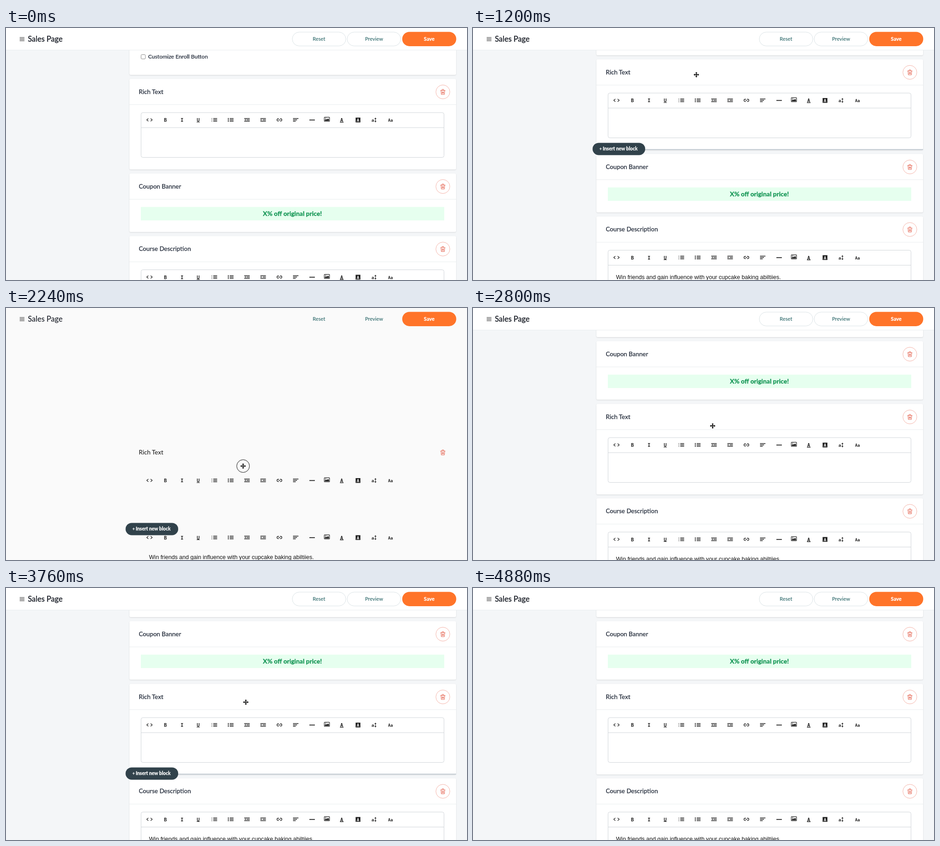
Write an HTML page that moves like this. It is 1012 by 554 pixels and loops after 5.28 s.

```html
<!DOCTYPE html>
<html lang="en">
<head>
<meta charset="utf-8">
<title>Sales Page</title>
<style>
  html, body { margin: 0; width: 100%; height: 100%; overflow: hidden; }
  svg { display: block; width: 1012px; height: 554px; font-family: Lato, "Open Sans", sans-serif;
    --page: #f4f6f8; --paper: #fff; --line: #e9edef; --frame: #d0d5d9; --ring: #f5b3a8;
    --mint: #e6ffef; --pill: #dbe3e6; --rule: #c0c9d1; --shadow: #00000020; --title: #303846; --stress: .25px; }
  svg.flat { --page: #fafafa; --paper: #fafafa; --line: #fafafa; --frame: #fafafa; --ring: #fafafa;
    --mint: #fafafa; --pill: #fafafa; --rule: #fafafa; --shadow: transparent; --title: #222; --stress: 0; }
  .page { fill: var(--page); }
  .paper { fill: var(--paper); }
  .card { fill: var(--paper); filter: drop-shadow(0 1px 1px var(--shadow)); }
  .line { stroke: var(--line); }
  .frame { fill: var(--paper); stroke: var(--frame); }
  .ring { fill: var(--paper); stroke: var(--ring); }
  .pill { fill: var(--paper); stroke: var(--pill); }
  .title { font-size: 13.5px; font-weight: 500; fill: var(--title); stroke: var(--title); stroke-width: var(--stress); }
  .heading { font-size: 16.5px; fill: #1c2029; stroke: #1c2029; }
  .action { font-size: 11.2px; font-weight: 500; fill: #286567; text-anchor: middle; }
  .bold { font-weight: 700; fill: #fff; stroke: #fff; stroke-width: .3px; }
  .offer { font-size: 14px; text-anchor: middle; fill: #129453; stroke: #129453; }
  .mono { font: 700 10.5px "DejaVu Sans Mono", monospace; text-anchor: middle; fill: #222; }
  .ink { stroke: #222; fill: none; }
</style>
</head>
<body>
<svg id="stage" viewBox="0 0 1012 554">
  <defs>
    <g id="trash">
      <circle class="ring" cx="959" cy="28.5" r="15.3"/>
      <path d="M953.5 25.5h11M957 25v-2h4v2M955 26l.6 8h6.8l.6-8M957.5 28v4M959 28v4M960.5 28v4" fill="none" stroke="#e4604d"/>
    </g>
    <g id="editor">
      <rect class="frame" x="296.5" y=".5" width="665" height="98.5" rx="4"/>
      <path class="line" style="stroke:var(--frame)" d="M297 33.5h665"/>
      <g id="tools"></g>
    </g>
  </defs>
  <rect class="page" width="1012" height="554"/>
  <g id="top">
    <rect class="card" x="271" y="-100" width="717" height="203" rx="3"/>
    <rect x="296.5" y="58.5" width="9.5" height="9.5" rx="2" fill="#fff" stroke="#888"/>
    <text class="title" x="312" y="67" style="font-size:12.3px">Customize Enroll Button</text>
  </g>
  <g id="course"></g>
  <g id="coupon"></g>
  <g id="rich"></g>
  <g id="header">
    <rect class="paper" width="1012" height="48"/>
    <path class="line" d="M0 48.5h1012"/>
    <path d="M30 20.5h10.5m-10.5 2h10.5m-10.5 2h10.5m-10.5 2h10.5m-10.5 2h10.5" stroke="#555" stroke-width=".9"/>
    <text class="title heading" x="48" y="30">Sales Page</text>
    <rect class="pill" x="628.5" y="9" width="117.5" height="30.5" rx="15.25"/>
    <rect class="pill" x="749" y="9" width="117.5" height="30.5" rx="15.25"/>
    <rect x="869.8" y="8.4" width="118.6" height="31.6" rx="15.8" fill="#ff7429"/>
    <text class="action" x="687" y="28">Reset</text>
    <text class="action" x="808" y="28">Preview</text>
    <text class="action bold" x="929" y="28">Save</text>
  </g>
  <g id="cursor">
    <circle id="press" r="14" fill="var(--paper)" stroke="#111"/>
    <path id="arrow" d="M0 0v11.5l2.7-2.4 1.9 4.3 2.2-1-1.9-4.2h3.6z" fill="#000" stroke="#fff" stroke-width=".9"/>
    <path id="move" d="M0-6 2.4-3.3H.8V-.8H3.3V-2.4L6 0 3.3 2.4V.8H.8V3.3H2.4L0 6-2.4 3.3H-.8V.8H-3.3V2.4L-6 0-3.3-2.4V-.8H-.8V-3.3H-2.4Z"
      fill="#000" stroke="#fff" stroke-width="1.4" paint-order="stroke"/>
  </g>
</svg>
<script>
const $ = id => document.getElementById(id);
const LOOP = 5280, STEP = 80;

// Toolbar, drawn around y = 17 inside the editor box
const glyph = (x, text, extra = '') => `<text class="mono" x="${x}" y="20.5" ${extra}>${text}</text>`;
const ink = (d, width = 1.5) => `<path class="ink" stroke-width="${width}" d="${d}"/>`;
const solid = d => `<path fill="#222" d="${d}"/>`;
const rows = (x, width) => ink([13.5, 16.5, 19.5].map(y => `M${x} ${y}h${width}`).join(''), 1.7);
const indent = x => ink(`M${x} 13.5h12M${x + 5} 16.5h7M${x} 19.5h12`, 1.7);
$('tools').innerHTML = [
  ink('M312.5 13.5 309 16.5l3.5 3M317.5 13.5l3.5 3-3.5 3', 1.3),
  glyph(350, 'B'), glyph(386.5, 'I', 'font-style="italic"'),
  glyph(422, 'U'), ink('M418.5 21.5h7', 1),
  rows(455, 8.5), ink('M452 12.5v2M452 15.7v1.8M452 18.7v2', .9),
  rows(491, 8.5), ink('M487 13.5h2M487 16.5h2M487 19.5h2', 1.8),
  indent(523), solid('M526.5 14.7v3.6l-3-1.8z'),
  indent(558.5), solid('M559 14.7v3.6l3-1.8z'),
  ink('M599 14h-1.5a2.6 2.6 0 0 0 0 5.2h1.5M601.5 14h1.5a2.6 2.6 0 0 1 0 5.2h-1.5M598 16.6h4.5', 1.3),
  ink('M630 13.5h12M630 16.5h9M630 19.5h6', 1.7),
  ink('M666 16.8h12', 1.8),
  '<rect class="ink" x="698.7" y="10.7" width="11.6" height="9" rx="1" stroke-width="1.2"/>',
  solid('M700 18.5v-2l2.5-2 2 1.5 2.5-3 2 3v2.5z'), '<circle cx="702" cy="13" r="1" fill="#222"/>',
  glyph(737, 'A'), ink('M733 21.7h8', 1.4),
  '<rect x="767.5" y="11.5" width="10.5" height="10.5" fill="#222"/>',
  glyph(772.7, 'A', 'style="fill:#fff;font-size:9px"'),
  glyph(805, 'a', 'style="font-size:9.5px"'),
  ink('M811 13v7.5', 1), solid('M808.7 14.5 811 11.5l2.3 3zM808.7 19 811 22l2.3-3z'),
  glyph(844, 'Aa', 'style="font-size:8.8px"')
].join('');

// Cards, each drawn from its own top edge
const card = (title, height, body) => `
  <rect class="card" x="271" width="717" height="${height}" rx="3"/>
  <path class="line" d="M271 56.5h717"/>
  <text class="title" x="291.5" y="32.8">${title}</text>
  <use href="#trash"/>${body}`;
const editor = '<use href="#editor" y="73.5"/>';

$('rich').innerHTML = card('Rich Text', 199, `${editor}
  <path id="rule" d="M272 198.2h716" stroke="var(--rule)" stroke-width="1.8"/>
  <g id="insert">
    <rect x="262.5" y="183.4" width="115.5" height="27" rx="13.5" fill="#31424b"/>
    <text class="bold" x="277.5" y="199.8" font-size="9">+</text>
    <text class="bold" x="285" y="200" font-size="10.4">Insert new block</text>
  </g>`);
$('coupon').innerHTML = card('Coupon Banner', 128.5, `
  <rect x="296" y="73.5" width="666" height="29.5" fill="var(--mint)"/>
  <text class="bold offer" x="628.7" y="92.5">X% off original price!</text>`);
$('course').innerHTML = card('Course Description', 240, `${editor}
  <text x="314" y="137.5" font-size="12.57" fill="#111" font-family="Liberation Sans, Arial, sans-serif">Win friends and gain influence with your cupcake baking abiltiies.</text>`);

// Tracks: [time, value, ...]
const tracks = {
  scroll: [[160, 0], [560, -42], [800, -42], [880, -43], [2400, -43], [2720, -39]],
  drag: [[1840, 0], [2240, 220], [2320, 222], [2720, 138]],
  swap: [[2400, 0], [2560, -208]],
  insert: [[720, 0], [960, 1], [2720, 1], [2800, 0], [3120, 0], [3200, .22], [3440, 1], [4560, 1], [4800, 0]],
  pointer: [[480, 425, 250], [640, 451, 128], [1360, 496, 99], [1840, 496, 99], [2240, 520.5, 347.5],
    [2320, 522, 349], [2720, 526, 262], [2960, 526.5, 251], [4080, 526.5, 251], [4240, 489, 284.5], [4480, 400, 570]]
};

function at(track, t) {
  const next = track.findIndex(key => key[0] > t);
  if (next < 0) return track[track.length - 1].slice(1);
  if (next === 0) return track[0].slice(1);
  const a = track[next - 1], b = track[next];
  const p = (t - a[0]) / (b[0] - a[0]), ease = p * p * (3 - 2 * p);
  return a.slice(1).map((v, i) => v + (b[i + 1] - v) * ease);
}

const place = (id, y, x = 0) => $(id).setAttribute('transform', `translate(${x} ${y})`);
const show = (id, opacity) => $(id).setAttribute('opacity', Number(opacity));
const within = (t, from, to) => t >= from && t < to;

function draw(t) {
  const value = name => at(tracks[name], t)[0];
  const scroll = Math.round(value('scroll'));
  const insert = value('insert');
  const [x, y] = at(tracks.pointer, t);
  $('stage').classList.toggle('flat', within(t, 2000, 2720));
  place('top', scroll);
  place('rich', 112 + scroll + Math.round(value('drag')));
  place('coupon', 320 + scroll + Math.round(value('swap')));
  place('course', 457.5 + scroll);
  show('insert', insert);
  show('rule', Math.min(1, insert * 5));
  place('cursor', y, x);
  show('cursor', within(t, 480, 4480));
  const moving = within(t, 960, 4320);
  show('move', moving);
  show('arrow', !moving);
  show('press', within(t, 1600, 2720));
}

const start = performance.now();
function tick() {
  const t = (performance.now() - start) % LOOP;
  draw(Math.floor(t / STEP) * STEP);
  requestAnimationFrame(tick);
}
tick();
</script>
</body>
</html>
```
